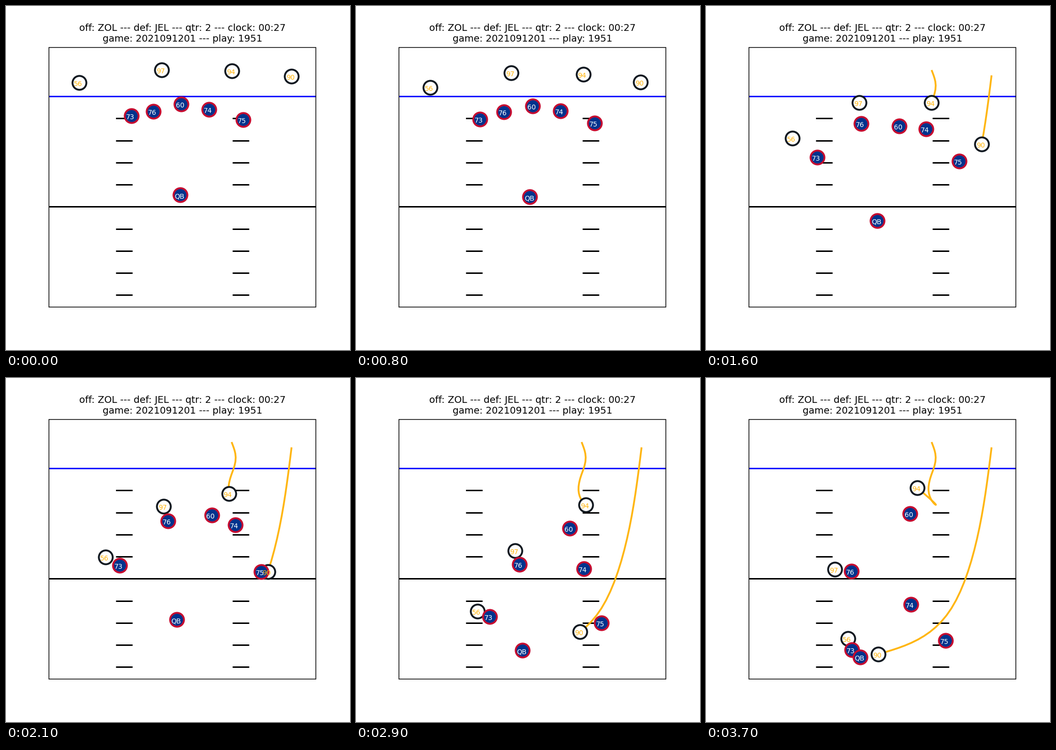
Animation, 705 px wide and 705 px high, one loop 3800 ms. Source, as a matplotlib script:

```python
import numpy as np
import matplotlib.pyplot as plt
from matplotlib.animation import FuncAnimation
from matplotlib.patches import Rectangle

SIZE, DPI = 705, 100
FRAMES, INTERVAL = 38, 100
PX = 72 / DPI  # points per pixel

LEFT, RIGHT, TOP, BOTTOM = 88.1, 634.5, 84.6, 616.9
SCRIMMAGE, YARD = 185.1, 45.25
TITLE = ("off: ZOL --- def: JEL --- qtr: 2 --- clock: 00:27\n"
         "game: 2021091201 --- play: 1951")

GOLD = "#FFB612"
DEFENSE = dict(face="white", edge="#101820", ink=GOLD)
OFFENSE = dict(face="#00338D", edge="#C60C30", ink="white")


def clock(frame):
    """Nearly still before the snap, then steady running time."""
    return 2 * np.log1p(np.exp((np.asarray(frame) - 10.5) / 2))


def run_route(key_frames, points):
    """Natural cubic spline through the key points, one position per frame."""
    t, p = clock(key_frames), np.array(points, float)
    h = np.diff(t)
    slope = np.diff(p, axis=0) / h[:, None]
    n = len(t)
    system, rhs = np.eye(n), np.zeros_like(p)
    for i in range(1, n - 1):
        system[i, i - 1:i + 2] = h[i - 1], 2 * (h[i - 1] + h[i]), h[i]
        rhs[i] = 6 * (slope[i] - slope[i - 1])
    m = np.linalg.solve(system, rhs)

    u = clock(np.arange(FRAMES))
    k = np.clip(np.searchsorted(t, u, side="right") - 1, 0, n - 2)
    d, hk = (u - t[k])[:, None], h[k][:, None]
    start = slope[k] - hk * (2 * m[k] + m[k + 1]) / 6
    return p[k] + d * (start + d * (m[k] / 2 + d * (m[k + 1] - m[k]) / (6 * hk)))


class Player:
    def __init__(self, label, team, key_frames, *points, trail=False):
        self.label, self.team, self.trail = label, team, trail
        self.track = run_route(key_frames, points)

    def add_to(self, ax, order):
        self.path, = ax.plot([], [], color=GOLD, lw=3.7 * PX, zorder=3)
        self.dot = ax.scatter([0], [0], s=(28.4 * PX) ** 2, lw=3.8 * PX,
                              fc=self.team["face"], ec=self.team["edge"],
                              zorder=4 + order / 100)
        self.text = ax.text(0, 0, self.label, color=self.team["ink"],
                            fontsize=10, ha="left", va="baseline", zorder=6)

    def move(self, frame):
        x, y = self.track[frame]
        self.dot.set_offsets([(x, y)])
        self.text.set_position((x - 11.3, y + 7))
        if self.trail:
            self.path.set_data(*self.track[:frame + 1].T)
        return self.path, self.dot, self.text


# Key frames: start, contact, turn (early or late), end of play.
EARLY, LATE = (0, 16, 25, 37), (0, 16, 29, 37)
HOOK = (0, 11, 16, 20, 30, 37)

players = [
    Player("56", DEFENSE, EARLY, (150, 157), (177, 271), (227, 432), (291, 534)),
    Player("97", DEFENSE, LATE, (319, 131), (314, 198), (326, 354), (264, 392)),
    Player("94", DEFENSE, HOOK, (463, 133), (470, 155), (462, 198),
           (456, 230), (470, 258), (433, 225), trail=True),
    Player("90", DEFENSE, EARLY, (585, 144), (565, 283), (503, 472), (353, 566),
           trail=True),
    Player("73", OFFENSE, LATE, (257, 225), (228, 310), (274, 489), (299, 557)),
    Player("76", OFFENSE, LATE, (302, 216), (318, 241), (335, 382), (298, 396)),
    Player("60", OFFENSE, LATE, (359, 201), (396, 246), (438, 308), (418, 278)),
    Player("74", OFFENSE, LATE, (416, 212), (451, 252), (467, 391), (420, 464)),
    Player("75", OFFENSE, LATE, (486, 233), (519, 318), (503, 502), (491, 538)),
    Player("QB", OFFENSE, EARLY, (357, 387), (351, 440), (348, 535), (316, 572)),
]


def draw_field(ax):
    ax.text((LEFT + RIGHT) / 2, 73.2, TITLE, fontsize=14, ha="center", va="baseline")
    line = dict(lw=3 * PX, zorder=1)
    ax.hlines(SCRIMMAGE, LEFT, RIGHT, color="blue", **line)
    ax.hlines(SCRIMMAGE + 5 * YARD, LEFT, RIGHT, color="black", **line)
    for i in range(1, 10):
        if i != 5:
            ax.hlines([SCRIMMAGE + i * YARD] * 2, [225, 464], [259, 498],
                      color="black", **line)
    ax.add_patch(Rectangle((LEFT, TOP), RIGHT - LEFT, BOTTOM - TOP, fill=False,
                           ec="black", lw=1.5 * PX, zorder=2))


plt.rcParams["font.family"] = "DejaVu Sans"
fig = plt.figure(figsize=(SIZE / DPI, SIZE / DPI), dpi=DPI, facecolor="white")
ax = fig.add_axes([0, 0, 1, 1])
ax.axis("off")
draw_field(ax)
for order, player in enumerate(players):
    player.add_to(ax, order)
ax.set(xlim=(0, SIZE), ylim=(SIZE, 0))


def update(frame):
    return [artist for player in players for artist in player.move(frame)]


anim = FuncAnimation(fig, update, frames=FRAMES, interval=INTERVAL,
                     init_func=lambda: update(0), repeat=True, repeat_delay=0)
plt.show()
```
